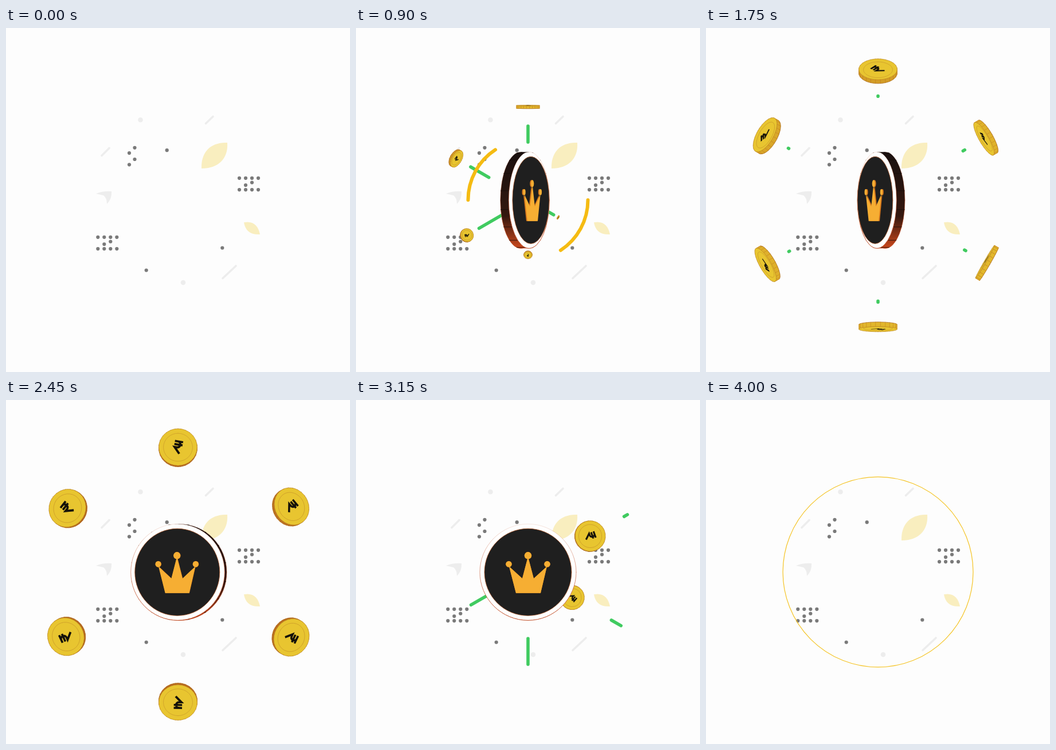
An HTML page with a canvas that plays this animation: 600x600 px, repeating every 4050 ms.

```html
<!DOCTYPE html>
<html lang="en">
<head>
<meta charset="utf-8">
<title>Coin burst</title>
<style>
html, body { margin: 0; width: 100%; height: 100%; overflow: hidden; background: #fdfdfd; }
canvas { display: block; width: 600px; height: 600px; }
</style>
</head>
<body>
<canvas id="stage" width="600" height="600"></canvas>
<script>
const ctx = document.getElementById('stage').getContext('2d');
const LOOP = 4050, STEP = 50, STAGGER = 200 / 3, COINS = 6;
const RAD = Math.PI / 180, TAU = Math.PI * 2;

const progress = (t, from, to) => Math.min(1, Math.max(0, (t - from) / (to - from)));
const smooth = u => u * u * (3 - 2 * u);
// Exponential ease-out from 0 to 1, and power ease-in from 1 to 0
const rise = (t, from, tau, power = 1) => 1 - Math.exp(-((Math.max(0, t - from) / tau) ** power));
const fall = (t, from, to, power = 4) => 1 - progress(t, from, to) ** power;

// Smooth monotone curve through a few [time, value] keys
function track(...keys) {
  const last = keys.length - 1;
  const slope = i => (keys[i + 1][1] - keys[i][1]) / (keys[i + 1][0] - keys[i][0]);
  const tangent = keys.map((_, i) => {
    if (i === 0 || i === last) return 0;
    const a = slope(i - 1), b = slope(i);
    return a * b <= 0 ? 0 : 2 * a * b / (a + b);
  });
  return t => {
    if (t <= keys[0][0]) return keys[0][1];
    if (t >= keys[last][0]) return keys[last][1];
    let i = 0;
    while (t > keys[i + 1][0]) i++;
    const h = keys[i + 1][0] - keys[i][0], u = (t - keys[i][0]) / h, v = 1 - u;
    return keys[i][1] * v * v * (1 + 2 * u) + keys[i + 1][1] * u * u * (3 - 2 * u)
      + h * u * v * (tangent[i] * v - tangent[i + 1] * u);
  };
}

const coinRadius = t => 228 * rise(t, 545, 285) * fall(t, 1960, 3005);
const coinSize = t => 67 * rise(t, 533, 385, 1.7) * fall(t, 1960, 3005, 8);
const coinFlip = t => 180 - 268 * Math.exp((900 - t) / 550);
const coinTwist = track([1000, 15], [1350, -75], [1750, -50], [2450, 10]);
const rayRest = t => 185 + 22 * smooth(progress(t, 1750, 2300));
const rayHead = t => rayRest(t) * rise(t, 533, 307) * fall(t, 2600, 3110);
const rayTail = t => rayRest(t) * rise(t, 675, 285) * fall(t, 2600, 3030);
const arcHead = track([550, 122], [900, 0], [1350, -66]);
const arcTail = track([550, 122], [900, 57], [1350, -58], [1420, -66]);
const medalTurn = track([350, 0], [900, 65], [1350, 403], [1750, 654], [2450, 707], [3150, 720]);
const medalScale = t => smooth(progress(t, 300, 700)) * (1 - smooth(progress(t, 3250, 3620)));
const ringGrowth = t => 1 - (1 - progress(t, 3600, 4050)) ** 2;

function ellipse(x, rx, ry, fill, stroke, width) {
  ctx.beginPath();
  ctx.ellipse(x, 0, rx, ry, 0, 0, TAU);
  if (fill) { ctx.fillStyle = fill; ctx.fill(); }
  ctx.strokeStyle = stroke;
  ctx.lineWidth = width;
  ctx.stroke();
}

function dot(x, y, r, color) {
  ctx.fillStyle = color;
  ctx.beginPath();
  ctx.arc(x, y, r, 0, TAU);
  ctx.fill();
}

function line(x1, y1, x2, y2, width, color) {
  ctx.strokeStyle = color;
  ctx.lineWidth = width;
  ctx.lineCap = 'round';
  ctx.beginPath();
  ctx.moveTo(x1, y1);
  ctx.lineTo(x2, y2);
  ctx.stroke();
}

function arc(r, from, to, width, color) {
  ctx.strokeStyle = color;
  ctx.lineWidth = width;
  ctx.lineCap = 'round';
  ctx.beginPath();
  ctx.arc(300, 300, r, from * RAD, to * RAD);
  ctx.stroke();
}

function fillPath(d, color) {
  ctx.fillStyle = color;
  ctx.fill(new Path2D(d));
}

function mix(a, b, u) {
  return `rgb(${a.map((v, i) => Math.round(v + (b[i] - v) * u)).join()})`;
}

function verticalGradient(r, ...colors) {
  const g = ctx.createLinearGradient(0, -r, 0, r);
  colors.forEach((color, i) => g.addColorStop(i / (colors.length - 1), color));
  return g;
}

// Foreshortening and lean of whichever face is turned to the viewer
function facing(deg) {
  const c = Math.cos(deg * RAD), s = Math.sin(deg * RAD);
  return c < 0 ? [-c, -s] : [c, s];
}

// Edge of a disc between its back and front planes, with ridge marks
function rim(back, front, rx, ry, fill, outline, ridge, ridges) {
  ellipse(back, rx, ry, fill, outline, 0.8);
  ctx.fillRect(Math.min(back, front), -ry, Math.abs(front - back), ry * 2);
  ctx.strokeStyle = ridge;
  ctx.beginPath();
  for (let i = 0; i < ridges; i++) {
    const a = (i + 0.5) / ridges * TAU, x = rx * Math.cos(a), y = ry * Math.sin(a);
    ctx.moveTo(back + x, y);
    ctx.lineTo(front + x, y);
  }
  ctx.stroke();
}

function drawRupee(size) {
  ctx.scale(size, size);
  ctx.strokeStyle = '#15120a';
  ctx.lineWidth = 0.32;
  ctx.lineCap = 'butt';
  ctx.stroke(new Path2D('M-.6 -.85H.6M-.6 -.38H.6M-.6 -.85H-.15C.4 -.85 .4 .05 -.15 .05H-.5L.35 .95'));
}

function drawCoin(t, k) {
  const d = coinSize(t);
  if (d < 0.5) return;
  const R = d / 2, out = (-90 - 60 * k) * RAD, dist = coinRadius(t);
  const [c, s] = facing(-coinFlip(t));
  const front = s * d * 0.06, rx = Math.max(c * R, 0.4);
  const side = u => mix([176, 92, 28], [226, 184, 44], u);
  const glow = s * s;
  ctx.save();
  ctx.translate(300 + dist * Math.cos(out), 300 + dist * Math.sin(out));
  ctx.rotate(out);
  rim(-front, front, rx, R, side(glow), '#ad6b1d', side(glow * 0.6), 24);
  ellipse(front, rx, R, '#e8c530', '#bd8622', 0.7);
  ellipse(front - s * R * 0.03, rx * 0.76, R * 0.76, null, '#c9992a', 0.7);
  ctx.translate(front, 0);
  ctx.scale(Math.max(c, 0.05), 1);
  ctx.rotate((90 + coinTwist(t)) * RAD);
  drawRupee(R * 0.36);
  ctx.restore();
}

function drawRay(t, k) {
  const head = rayHead(t), tail = rayTail(t);
  if (head <= 0) return;
  const a = (-90 - 60 * k) * RAD, x = Math.cos(a), y = Math.sin(a);
  line(300 + x * tail, 300 + y * tail, 300 + x * (head + 0.05), 300 + y * (head + 0.05), 5.6, '#40cb60');
}

function drawArcs(t) {
  const head = arcHead(t), tail = arcTail(t);
  if (tail - head < 0.3) return;
  for (const turn of [0, 180]) arc(104.5, head + turn, tail + turn, 6, '#f5bb12');
}

function drawCrown(color) {
  fillPath('M-21 36.5L-33 -10L-10 11L0 -27L10 11L33 -10L22 36.5Z', color);
  dot(-33.5, -14, 5.2, color);
  dot(0, -29, 6.2, color);
  dot(33.5, -14, 5.2, color);
}

function drawMedal(t) {
  const scale = medalScale(t);
  if (scale < 0.01) return;
  const R = 84, [c, s] = facing(medalTurn(t)), rx = Math.max(c * R, 0.5);
  const side = verticalGradient(R, '#1a1110', '#26140f', '#35180f', '#cc481c');
  const edge = verticalGradient(R, 'rgba(200,90,50,.15)', '#bd431a');
  ctx.save();
  ctx.translate(300, 300.3);
  ctx.scale(scale, scale);
  if (Math.abs(s) > 0.02) rim(-14 * s, 2 * s, rx, R, side, edge, '#170d0a', 16);
  ellipse(2 * s, rx, R, '#ffffff', edge, 1);
  ellipse(5.5 * s, rx * 0.905, R * 0.905, '#1f1f1f', '#c4632f', 0.7);
  for (const [shift, color] of [[6.5, '#d5761c'], [8.5, '#f6ae33']]) {
    ctx.save();
    ctx.translate(shift * s, 0);
    ctx.scale(Math.max(c, 0.02), 1);
    drawCrown(color);
    ctx.restore();
  }
  ctx.restore();
}

function drawRing(t) {
  if (t < 3650) return;
  const u = ringGrowth(t);
  arc(168 * u, 0, 360, 1 + 17 * (1 - u), '#f5c426');
}

const spot = (x, y) => dot(x, y, 3.1, '#7a7a7a');

function drawGrid(x, y) {
  for (let i = 0; i < 4; i++) {
    spot(x + i * 11, y);
    spot(x + i * 11, y + 20.3);
  }
  spot(x + 22, y + 7.7);
  spot(x + 11, y + 12.3);
}

function drawDecor() {
  const pale = '#ededed', leaf = '#f9eebf';
  line(348.5, 166.5, 361, 154.5, 3.6, pale);
  line(167, 222.5, 180, 209.5, 3.6, pale);
  line(378, 436.5, 401, 415, 3.6, pale);
  dot(234.5, 160.3, 4.3, pale);
  dot(309, 444, 4.3, pale);
  fillPath('M157 289Q170 284 184 285Q185 298 176 307Q176 296 170 292Z', pale);
  fillPath('M386 200C355 199 340 218 341 245C370 245 388 228 386 200Z', leaf);
  fillPath('M415 339C432 336 440 345 443 360C426 361 417 353 415 339Z', leaf);
  drawGrid(407, 261.8);
  drawGrid(160.3, 364.8);
  for (const y of [208.8, 229]) {
    spot(224.5, y);
    spot(215, y + 9.3);
  }
  spot(280.7, 213.2);
  spot(377.3, 383.5);
  spot(244.7, 422.5);
}

function draw(t) {
  ctx.fillStyle = '#fdfdfd';
  ctx.fillRect(0, 0, 600, 600);
  drawDecor();
  for (let k = 0; k < COINS; k++) drawRay(t - k * STAGGER, k);
  drawArcs(t);
  for (let k = 0; k < COINS; k++) drawCoin(t - k * STAGGER, k);
  drawMedal(t);
  drawRing(t);
}

const start = performance.now();
function tick() {
  const t = (performance.now() - start) % LOOP;
  draw(Math.floor(t / STEP) * STEP);
  requestAnimationFrame(tick);
}
tick();
</script>
</body>
</html>
```
